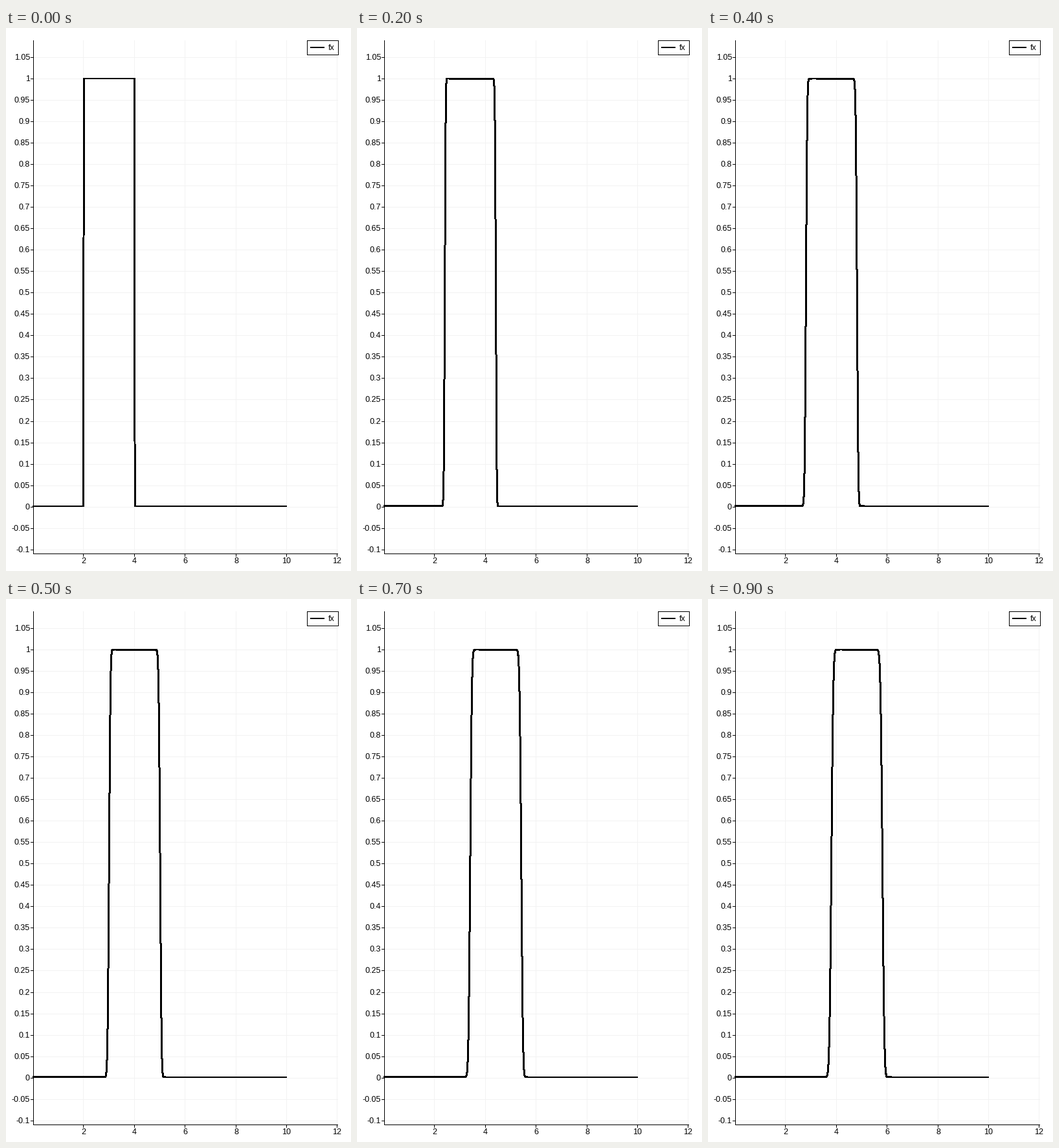
Animation, 533 px wide and 838 px high, one loop 1 s. Source, as a matplotlib script:

```python
import numpy as np
import matplotlib.pyplot as plt
from matplotlib.animation import FuncAnimation
from matplotlib.patches import Rectangle

W, H, DPI = 533, 838, 64
PT = 72 / DPI                      # points per pixel
LEFT, RIGHT, TOP, BOTTOM = 42, 513, 19, 811
GRID = "#f2f2f2"

fig = plt.figure(figsize=(W / DPI, H / DPI), dpi=DPI, facecolor="white")
ax = fig.add_axes([0, 0, 1, 1])
ax.set(xlim=(0, W), ylim=(H, 0))
ax.axis("off")


def box(x, y, w, h, color="black", z=1):
    ax.add_patch(Rectangle((x, y), w, h, fc=color, lw=0, aa=False, zorder=z))


def label(x, y, text, ha):
    ax.text(x, y, text, ha=ha, va="baseline", fontsize=12.5 * PT,
            family="Liberation Sans", color="black", zorder=5)


def stroke(x, y):
    return ax.plot(x, y, color="black", lw=2 * PT, aa=False, snap=False,
                   solid_capstyle="butt", solid_joinstyle="bevel", zorder=4)[0]


# Grid, ticks and labels
for i in range(24):
    row = int(45.67 + 33.02 * i)
    box(LEFT, row, RIGHT - LEFT, 1, GRID)
    box(38, row, 4, 1, z=3)
    label(37, row + 4, f"{(105 - 5 * i) / 100:g}", "right")

for value in range(2, 13, 2):
    col = int(41.55 + 39.2 * value)
    box(col, TOP, 1, BOTTOM - TOP, GRID)
    box(col, BOTTOM, 1, 5, z=3)
    label(col + 0.5, 826, str(value), "center")

box(LEFT, TOP, 1, BOTTOM - TOP + 1, z=3)
box(LEFT, BOTTOM, RIGHT - LEFT, 1, z=3)

# Legend
box(465, 19, 49, 23, z=2)
box(466, 20, 47, 21, "white", z=2)
stroke([470, 492], [30, 30])
label(498, 34, "fx", "left")

# Square pulse carried right by a first-order upwind scheme
COURANT, STEPS_PER_FRAME, FRAMES = 0.8, 25, 10
cells = np.arange(1001)
x_pixels = 41.29 + 39.25 * cells / 100


def pulse(frame):
    u = ((cells >= 200) & (cells <= 400)).astype(float)
    for _ in range(STEPS_PER_FRAME * frame + 1):
        u[1:] -= COURANT * np.diff(u)
    return u


curve = stroke([], [])


def update(frame):
    curve.set_data(x_pixels, 738 - 660 * pulse(frame))
    return [curve]


anim = FuncAnimation(fig, update, frames=FRAMES, interval=100, repeat=True,
                     repeat_delay=0)
plt.show()
```
